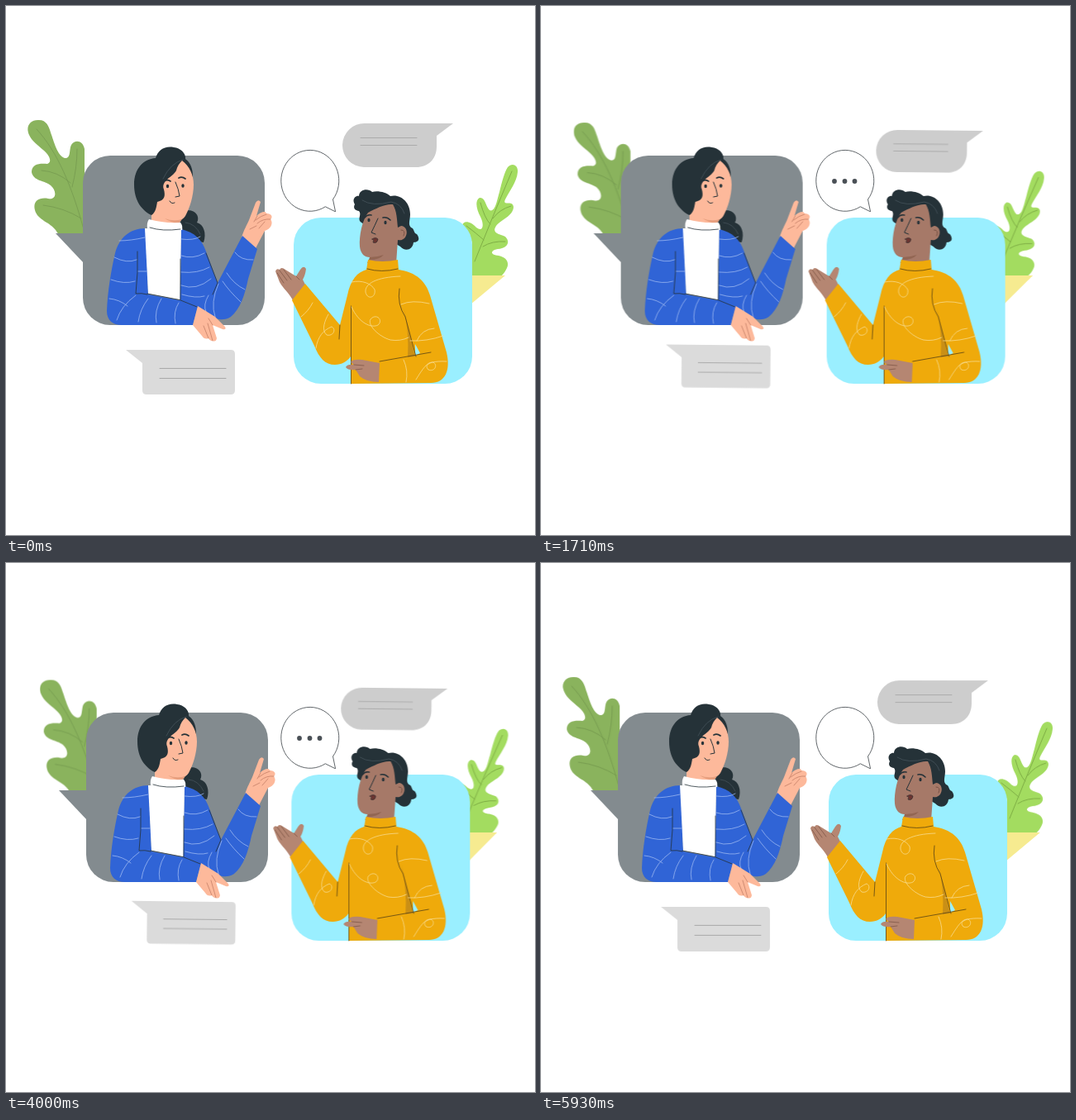
An HTML page for the animation above (6000 ms loop, 640 by 640 pixels).

```html
<!DOCTYPE html>
<html lang="en">
<head>
<meta charset="utf-8">
<title>Conversation</title>
<style>
html, body { margin: 0; width: 100%; height: 100%; overflow: hidden; background: #fff; }
svg { display: block; width: 100%; height: 100%; }
path, line { stroke-linecap: round; stroke-linejoin: round; }
.line { fill: none; stroke-width: .8; }

/* Everything drifts out and back with one shared curve */
.drift { animation: drift 3s cubic-bezier(.3, .12, .4, 1) infinite alternate; }
@keyframes drift { from { transform: none; } to { transform: var(--to); } }
#left { --to: translateX(4.5px); }
#right { --to: translateX(-3px); }
#leafL { --to: translate(12px, 2.5px) scaleY(.99); transform-origin: 95px 275px; }
#leafR { --to: translateX(-9.5px) scale(.98, .925); transform-origin: 590px 326px; }
#potR { --to: scaleX(.8); transform-origin: 563px 326px; }
#noteL { --to: translate(4px, -8.7px) rotate(.7deg) scale(.95); transform-origin: 211px 443px; }
#noteR { --to: translate(-5px, 9.2px) rotate(.7deg) scale(.955); transform-origin: 474px 168.5px; }

.dot { fill: #4a5056; transform-box: fill-box; transform-origin: center; animation: dot 6s linear infinite both; }
.dot:nth-child(2) { animation-name: dot2; }
.dot:nth-child(3) { animation-name: dot3; }
@keyframes dot {
  0%, 5% { transform: scale(0); }
  10%, 40% { transform: scale(1); }
  43%, 57.6% { transform: scale(0); }
  60.5%, 90% { transform: scale(1); }
  93%, 100% { transform: scale(0); }
}
@keyframes dot2 {
  0%, 6.5% { transform: scale(0); }
  10.3%, 39% { transform: scale(1); }
  41.5%, 58.5% { transform: scale(0); }
  61.5%, 89% { transform: scale(1); }
  92%, 100% { transform: scale(0); }
}
@keyframes dot3 {
  0%, 7.8% { transform: scale(0); }
  11.5%, 38% { transform: scale(1); }
  41%, 59.3% { transform: scale(0); }
  62.5%, 88% { transform: scale(1); }
  91%, 100% { transform: scale(0); }
}
</style>
</head>
<body>
<svg viewBox="0 0 640 640">
  <defs>
    <clipPath id="soilL"><path d="M0 100H320V275H0Z"/></clipPath>
    <clipPath id="soilR"><path d="M400 100H640V326H400Z"/></clipPath>
  </defs>

  <!-- Notes -->
  <g id="noteR" class="drift">
    <path fill="#cdcdcd" d="M434 142H541L521 157V170C521 185 511 195 496 195H433A26.5 26.5 0 0 1 434 142Z"/>
    <path class="line" stroke="#a3a3a3" d="M429 159.5H497M429 168.5H497"/>
  </g>
  <g id="noteL" class="drift">
    <path fill="#dbdbdb" d="M145 416H272Q277 416 277 421V465Q277 470 272 470H170Q165 470 165 465V432Z"/>
    <path class="line" stroke="#9c9c9c" d="M186 438.5H266M186 450.5H266"/>
  </g>

  <!-- Left speaker -->
  <g id="left" class="drift">
    <g clip-path="url(#soilL)">
      <g id="leafL" class="drift">
        <path fill="#8ab35d" d="M28 156C23 145 30 137 40 138C49 138 52 146 54 153C58 164 62 181 71 184C79 185 76 174 79 168C84 161 93 163 95 173V290H72C68 283 64 277 60 271C54 262 38 259 35 247C32 236 40 231 51 233C61 235 62 224 54 217C47 211 33 212 31 201C31 191 41 190 50 191C56 189 53 181 46 175C38 168 31 163 28 156Z"/>
        <path class="line" stroke="#759a50" d="M37 149C62 176 80 218 95 274M43 199Q62 200 78 214M86 173Q86 196 80 219M45 241Q70 244 91 257"/>
      </g>
    </g>
    <path fill="#838b8f" d="M60 275H94V311Z"/>
    <rect x="93" y="181" width="220" height="205" rx="33" fill="#838b8f"/>

    <!-- Hair and face -->
    <path fill="#253238" d="M213 249C226 243 236 253 231 262C239 264 243 275 239 286C224 284 214 275 211 263Z"/>
    <path fill="#253238" d="M181 184C184 174 192 169 203 171C212 172 218 179 217 185C224 190 226 198 226 206L206 252L178 254C164 248 155 235 155 216C155 197 166 185 181 184Z"/>
    <path fill="#fdb99b" d="M213 187C222 194 227 204 227 216C227 230 222 245 217 254C213 260 208 260 200 260L211 264L176 264V253C181 250 182 243 183 237C192 235 193 230 191 222C187 211 202 207 206 199C207 194 210 190 213 187Z"/>
    <path fill="#e79f7e" d="M192 257Q202 261 213 258L209 263Q199 262 192 257Z"/>
    <path class="line" stroke="#46545b" d="M214 186Q199 190 190 209M217 262Q229 263 235 276"/>
    <g fill="#253238">
      <ellipse cx="195.5" cy="218" rx="1.7" ry="2.3"/>
      <ellipse cx="214" cy="217.5" rx="1.7" ry="2.3"/>
    </g>
    <path class="line" stroke="#253238" d="M205 213Q209 222 210 230L205 231M198 236Q200 240 204 238" style="stroke-width:1"/>
    <path class="line" stroke="#253238" d="M190 213Q194 209 199 212M209 208Q213 206 217 209" style="stroke-width:1.7"/>

    <!-- Jacket, collar and hands -->
    <path fill="#fdb99b" d="M285 280C288 270 291 266 294 259L302 238Q305 233 308 237L303 254C309 248 315 248 315 251C322 251 323 256 320 258C324 263 320 270 313 272L301 295Z"/>
    <path class="line" stroke="#c57f67" d="M300 261L304 254M302 259Q308 254 315 252M304 263Q311 257 320 258M306 269L313 261M295 270L303 266"/>
    <path fill="#3064d6" d="M169 269C149 269 137 281 132 299C127 321 123 345 122 369C122 380 129 386 140 386H226L232 364L245 373C252 379 263 382 272 376C283 367 289 350 293 330L304 294L286 278L256 335L242 297C237 282 228 274 212 270L210 356L172 349Z"/>
    <path fill="#fff" d="M168 269L212 270L210.500 355.500L172 348Z"/>
    <path fill="#fff" d="M173 258Q190 263 211 262Q214 265 213 271Q192 274 171 269Q170 262 173 258Z"/>
    <path class="line" stroke="#253238" d="M174 268Q189 273 211 270M171 348L210 355.500L231 364M159 297Q160 323 157 348Q164 347 171 349M242 299L256 335L250 349M211 355V306"/>
    <path class="line" stroke="#9db9f1" d="M137 284Q151 284 168 280M131 304Q146 312 158 307M160 321H170M127 331Q143 337 156 333M125 354Q137 355 147 363M134 380Q139 363 157 350M160 382Q162 367 172 354M182 383Q179 369 188 354M205 384Q202 370 209 359M212 282Q227 284 235 279M212 302Q226 307 240 299M212 322Q232 324 246 316M212 338Q230 345 248 330M213 349Q230 354 240 351M253 376Q247 359 257 336M267 323Q276 337 289 343M262 333Q270 345 284 358M277 298Q284 308 299 307M242 370Q238 362 245 350"/>
    <path fill="#fdb99b" d="M232 363L253 376L265 388Q267 392 262 391L250 386L255 402Q254 407 250 405Q247 406 245 402Q240 404 237 399L226 386Z"/>
    <path class="line" stroke="#c57f67" d="M244 384L250 405M239 387L245 402M250 386L245 378"/>
  </g>

  <!-- Right speaker -->
  <g id="right" class="drift">
    <g clip-path="url(#soilR)">
      <g id="leafR" class="drift">
        <path fill="#a3dc60" d="M561 335L563 290C567 281 553 275 552 266C553 258 563 261 569 268C577 274 579 265 574 255C569 246 567 235 573 232C580 231 580 242 585 247C592 250 594 235 597 225C600 213 603 201 607 195C612 189 620 192 619 201C618 213 609 224 604 234C600 243 613 234 614 243C614 254 598 259 593 266C587 275 597 276 604 279C611 286 606 293 595 294C585 296 586 301 596 302C606 304 609 311 606 317C603 324 597 329 590 335Z"/>
        <path class="line" stroke="#7fae46" d="M612 200Q589 254 567 309M574 238Q579 257 586 264M611 242Q597 246 589 257M557 266Q569 275 578 283M604 285Q588 284 577 291" style="stroke-width:1"/>
      </g>
    </g>
    <path id="potR" class="drift" fill="#f6eb90" d="M562 326H604L562 361Z"/>
    <rect x="348" y="256" width="216" height="201" rx="33" fill="#9aefff"/>

    <!-- Hair and face -->
    <path fill="#253238" d="M422 240C418 234 423 229 427 230C427 222 438 220 443 225C449 223 460 225 465 230C477 227 489 237 489 252C489 259 486 264 490 268C495 270 492 274 497 276C502 283 498 286 493 286C492 296 482 297 477 291L430 262C424 258 431 253 427 248C421 247 420 243 422 240Z"/>
    <path fill="#a67968" d="M438 250C431 259 427 278 428 291C429 300 434 304 440 304L437 311L472 312L474 283C486 286 489 267 478 266L474 268C473 259 473 248 468 240C459 239 447 245 438 250Z"/>
    <path fill="#926653" d="M440 304Q449 304 457 301Q452 307 440 307Z"/>
    <path class="line" stroke="#6d4a3d" d="M478 271Q484 271 481 278"/>
    <path class="line" stroke="#46545b" d="M431 235Q443 243 466 237Q478 239 482 251"/>
    <g fill="#253238">
      <ellipse cx="439" cy="259" rx="1.6" ry="2.3"/>
      <ellipse cx="459" cy="262" rx="1.6" ry="2.3"/>
    </g>
    <path class="line" stroke="#253238" d="M450 257Q446 266 442 274L447 276" style="stroke-width:1"/>
    <path class="line" stroke="#253238" d="M434 256Q437 252 442 253M456 256Q461 255 465 259" style="stroke-width:1.6"/>
    <path fill="#6b3531" stroke="#352f30" stroke-width=".7" d="M443 282Q447 279 450 282Q449 288 444 286Q446 283 443 282Z"/>

    <!-- Sweater and hands -->
    <path fill="#b58672" d="M348 358C343 347 336 343 331 334L326 321Q327 317 331 319Q333 315 338 319L351 327L356 319Q360 313 363 318Q362 326 359 331L363 339Z"/>
    <path class="line" stroke="#7f5748" d="M331 320L340 332M336 319L345 331M328 323L336 335M351 327L355 331"/>
    <path fill="#efaa0b" d="M438 307Q455 311 474 307L475 319C496 322 508 333 513 350L533 419C538 440 532 456 514 456L417 457V424C413 430 406 434 398 434C386 434 379 426 373 411L346 356L362 336L404 386L413 350C417 331 425 322 436 319Z"/>
    <path fill="#c98f16" d="M481 365L495 424L486 425Q488 395 481 365Z"/>
    <path fill="#9aefff" d="M495 409L501 420L495 423Z"/>
    <path class="line" stroke="#594316" d="M437 318Q454 323 474 318M417.500 363V457M404 386L403 403M476 342Q473 361 483 376L496 424M452 430L514 419"/>
    <path class="line" stroke="#f8dc91" d="M418 334C431 331 442 336 446 343C448 353 437 356 435 346C434 336 448 328 477 327M418 364C427 384 442 390 450 386C457 380 448 371 441 379C437 386 451 400 465 404Q477 406 487 401M357 376Q366 369 371 359M375 414C377 400 384 392 394 388C400 391 396 400 388 398C381 392 386 380 390 373M478 361Q491 355 512 360M497 405Q503 391 518 390M489 405Q509 406 529 399M481 428Q487 441 484 455M496 452C504 439 510 430 517 431C523 435 518 443 511 440C505 434 513 429 533 430"/>
    <path fill="#b58672" d="M452 432L431 428Q419 427 417 431L421 434Q413 433 411 437Q414 441 423 440L428 448Q436 455 451 455Z"/>
    <path class="line" stroke="#7f5748" d="M421 434L433 435M423 440L431 439"/>
  </g>

  <!-- Typing balloon -->
  <path fill="#fff" stroke="#50555a" stroke-width=".9" d="M386 243A35 37 0 1 1 395.500 234L398.500 248.500Z"/>
  <g>
    <circle class="dot" cx="355" cy="212" r="2.900"/>
    <circle class="dot" cx="367.500" cy="212" r="2.900"/>
    <circle class="dot" cx="379.500" cy="212" r="2.900"/>
  </g>
</svg>
</body>
</html>
```
